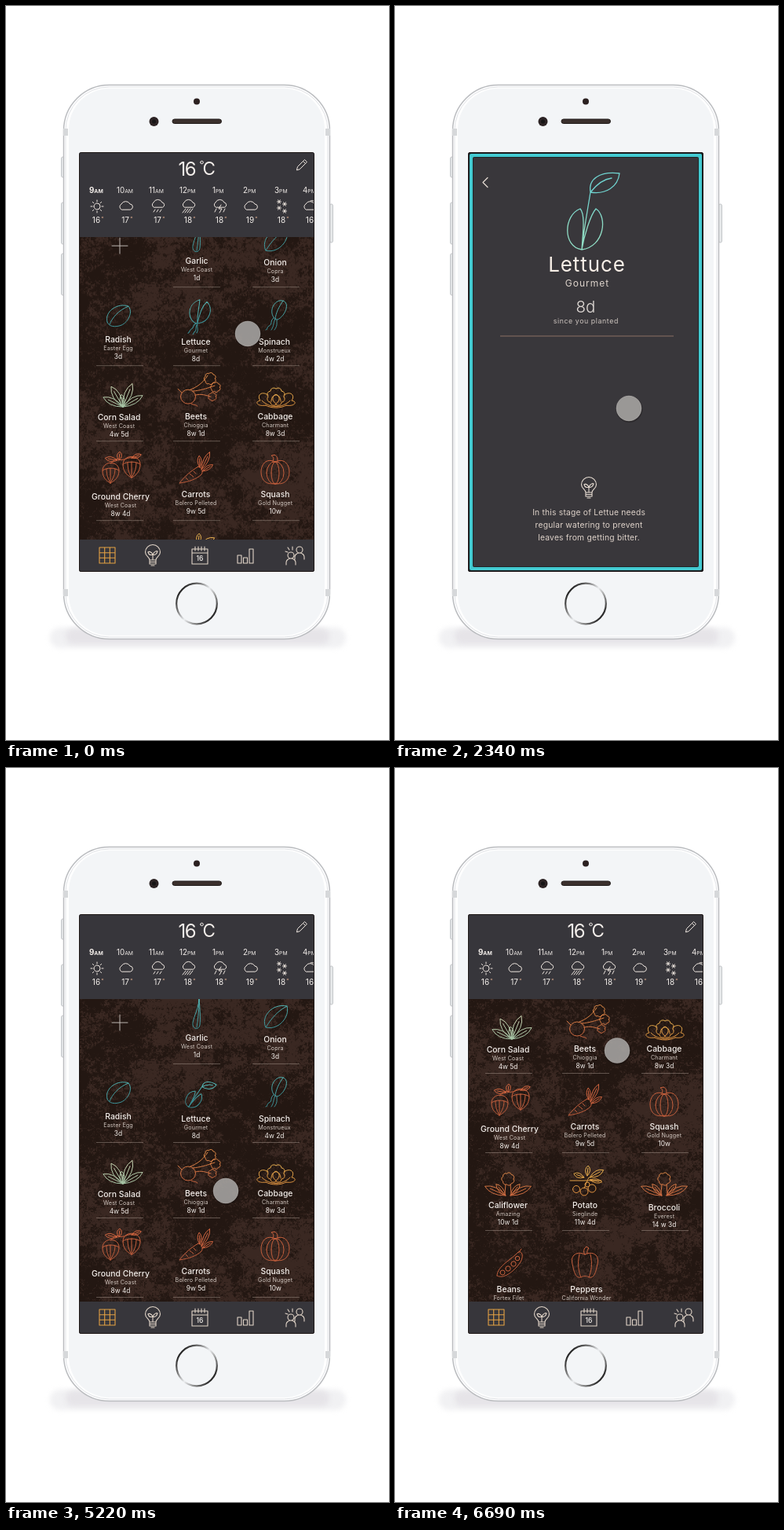
An HTML page with a canvas for the animation above (6.72 s loop, 488 px wide and 934 px high).

```html
<!DOCTYPE html>
<html lang="en">
<head>
<meta charset="utf-8">
<title>Garden planner</title>
<style>
html, body { margin: 0; width: 100%; height: 100%; overflow: hidden; background: #fff; }
canvas { display: block; width: 488px; height: 934px; }
</style>
</head>
<body>
<canvas id="stage"></canvas>
<script>
const LOOP = 6720;
const canvas = document.getElementById('stage');
const ctx = canvas.getContext('2d');
const dpr = window.devicePixelRatio || 1;
canvas.width = 488 * dpr;
canvas.height = 934 * dpr;

// ---------- timing ----------
const ramp = (t, a, b) => Math.min(1, Math.max(0, (t - a) / (b - a)));
const mix = (a, b, p) => a + (b - a) * p;
const easeOut = p => 1 - (1 - p) ** 3;
const easeInOut = p => p < .5 ? 4 * p ** 3 : 1 - 4 * (1 - p) ** 3;

const touchPath = [
  [0, 308, 417], [600, 262, 414], [1200, 262, 414], [1740, 298, 512], [2520, 298, 512],
  [3270, 277, 546], [4200, 277, 546], [5000, 280, 538], [5300, 280, 538], [6480, 283, 359.5]
];
function touchAt(t) {
  const i = touchPath.findIndex(k => k[0] > t);
  if (i < 0) return touchPath.at(-1).slice(1);
  const [a, b] = [touchPath[i - 1], touchPath[i]];
  const p = (b[0] === 6480 ? easeOut : easeInOut)(ramp(t, a[0], b[0]));
  return [mix(a[1], b[1], p), mix(a[2], b[2], p)];
}
const scrollAt = t => t < 3450
  ? -19 * (1 - easeOut(ramp(t, 0, 400)))
  : -184 * easeOut(ramp(t, 5300, 6480));

// ---------- drawing helpers ----------
function text(str, x, y, size, { ls = 0, weight = 400, color = '#f3eeea', align = 'center' } = {}) {
  ctx.font = `${weight} ${size}px Inter, sans-serif`;
  ctx.letterSpacing = ls + 'px';
  ctx.textAlign = align;
  ctx.fillStyle = color;
  ctx.fillText(str, x + (align === 'center' ? ls / 2 : 0), y + size * .36);
  return ctx.measureText(str).width;
}
function box(x, y, w, h, r, fill, stroke, width = 1) {
  ctx.beginPath();
  ctx.roundRect(x, y, w, h, r);
  if (fill) { ctx.fillStyle = fill; ctx.fill(); }
  if (stroke) { ctx.strokeStyle = stroke; ctx.lineWidth = width; ctx.stroke(); }
}
function dot(x, y, r, fill) {
  ctx.beginPath();
  ctx.arc(x, y, r, 0, 7);
  ctx.fillStyle = fill;
  ctx.fill();
}
function rule(x1, y, x2, color) {
  ctx.fillStyle = color;
  ctx.fillRect(x1, y, x2 - x1, 1);
}
function group(alpha, draw) {
  if (alpha <= 0) return;
  ctx.save();
  ctx.globalAlpha *= alpha;
  draw();
  ctx.restore();
}
function icon(path, x, y, color, { scale = 1, angle = 0, width = 1 } = {}) {
  ctx.save();
  ctx.translate(x, y);
  ctx.rotate(angle * Math.PI / 180);
  ctx.scale(scale, scale);
  ctx.lineWidth = width / scale;
  ctx.lineCap = ctx.lineJoin = 'round';
  if (Array.isArray(color)) {
    const g = ctx.createLinearGradient(0, -18, 0, 18);
    color.forEach((c, i) => g.addColorStop(i, c));
    color = g;
  }
  ctx.strokeStyle = color;
  ctx.stroke(path);
  ctx.restore();
}

// ---------- icon shapes, centred on 0,0 ----------
const P = (...parts) => new Path2D(parts.join(' '));
const ring = (x, y, rx, ry = rx) =>
  `M${x - rx} ${y}a${rx} ${ry} 0 1 0 ${2 * rx} 0a${rx} ${ry} 0 1 0 ${-2 * rx} 0`;
function leaf(x, y, deg, len, w) {
  const a = deg * Math.PI / 180, dx = Math.sin(a) * len, dy = -Math.cos(a) * len;
  const px = Math.cos(a) * w, py = Math.sin(a) * w, mx = x + dx * .6, my = y + dy * .6;
  return `M${x} ${y}Q${mx + px} ${my + py} ${x + dx} ${y + dy}` +
    `Q${mx - px} ${my - py} ${x} ${y}L${x + dx * .75} ${y + dy * .75}`;
}
function frill(x, y, r, n) {
  const bump = r * Math.sin(Math.PI / n) * 1.1;
  let d = '';
  for (let i = 0; i <= n; i++) {
    const a = i / n * Math.PI * 2;
    d += `${i ? `A${bump} ${bump} 0 0 1 ` : 'M'}${x + r * Math.cos(a)} ${y + r * Math.sin(a)} `;
  }
  return d;
}
const headOfLeaves = P(frill(0, -7, 7, 7), 'M-4 11L-3 0M4 11L3 0',
  leaf(-3, 14, -66, 29, 8), leaf(3, 14, 66, 29, 8), leaf(-3, 14, -40, 19, 6), leaf(3, 14, 40, 19, 6));

const SHAPES = {
  plus: P('M-10 0H10M0 -10V10'),
  garlic: P('M3 -20C2 -5 -6 6 -5 13C-4 19 3 19 4 13C5 5 4 -8 3 -20C3 -2 1 8 0 16'),
  onion: P('M-13 13C-20 0 -5 -18 14 -14C18 -1 4 17 -13 13C-6 2 2 -8 14 -14'),
  radish: P('M-14 8C-18 -6 0 -17 13 -12C19 -5 13 8 4 12C-4 15 -12 14 -14 8M-11 11C-8 3 0 -7 13 -12'),
  seed: P('M-7 16C-25 2 -12 -38 26 -33C22 -25 4 -5 -7 16M-7 16C10 -2 22 -16 39 -20C47 0 24 28 -7 16',
    'M-7 16C-16 9 -18 22 -26 21C-32 21 -33 26 -38 26M-8 18C-15 18 -14 28 -20 30C-26 30 -25 34 -29 34',
    'M-8 19C-12 21 -10 32 -19 35'),
  sprout: P('M-5 48C-30 44 -28 4 -7 -4C0 4 -4 30 -5 48C-2 30 6 4 13 -4C28 6 24 44 -5 48',
    'C-2 20 2 0 6 -25C3 -42 18 -52 43 -49C41 -32 26 -22 6 -25C14 -35 24 -42 33 -43'),
  spinach: P('M-3 4C-10 -6 0 -20 9 -17C18 -14 12 2 2 7C0 7 -2 6 -3 4M9 -17C4 -10 0 -2 -1 6',
    'M-3 5C-8 8 -4 13 -9 15C-12 16 -10 20 -13 20M-1 6C-4 12 -2 14 -6 20M1 7C1 12 2 15 -2 20'),
  cornSalad: P(leaf(0, 14, -64, 28, 8), leaf(0, 14, -30, 30, 9), leaf(0, 14, 22, 32, 9),
    leaf(0, 14, 60, 29, 8), leaf(0, 14, -6, 16, 6)),
  beets: P(ring(-14, 8, 9.5, 9), 'M-22 3L-27 -2M-10 17C-6 19 -4 18 -2 20',
    'M-11 -1C-4 -4 4 -8 11 -19M-8 1C2 0 8 -2 20 -6M-5 6C3 4 8 6 15 8',
    frill(14, -15, 6.5, 7), frill(21, -4, 5.5, 7), frill(17, 8, 4.5, 6)),
  cabbage: P(frill(0, -1, 10, 8), 'M-6 5C-6 -6 6 -6 6 5M0 8C-6 4 -5 -2 0 -4C5 -2 6 4 0 8',
    'M-10 -3C-18 -9 -25 -3 -20 4C-28 5 -24 12 -13 10M10 -3C18 -9 25 -3 20 4C28 5 24 12 13 10M-18 4C-8 14 8 14 18 4M-13 10C-6 14 6 14 13 10'),
  cherry: P('M-25 4C-25 -9 -4 -9 -4 4C-4 13 -10 17 -15 20C-20 17 -25 13 -25 4C-20 0 -9 0 -4 4M1 -4C1 -17 23 -17 23 -4C23 5 17 11 12 13C6 10 1 5 1 -4C6 -8 18 -8 23 -4',
    'M-15 1V20M-20 2C-20 10 -18 14 -15 20M-9 2C-9 10 -12 14 -15 20M12 -7V13M7 -6C7 3 9 8 12 13M18 -6C18 3 15 8 12 13',
    leaf(-6, -9, -80, 16, 6), leaf(-4, -9, 5, 11, 6), leaf(12, -12, 70, 13, 5), 'M-14 -5C-12 -9 -8 -12 -4 -10C2 -8 8 -14 12 -12'),
  carrots: P('M3 -4C9 -3 9 3 7 6C0 12 -8 15 -21 17C-15 9 -6 1 3 -4M-8 5L-3 9M-3 2L0 5M-13 10L-10 13',
    leaf(7, 0, 25, 25, 6), leaf(8, 2, 58, 16, 5), leaf(5, -3, -3, 15, 5)),
  squash: P('M0 -10C-12 -16 -18 -6 -18 3C-18 14 -10 20 0 17C10 20 18 14 18 3C18 -6 12 -16 0 -10',
    ring(0, 4, 5, 14), ring(0, 4, 11, 14.5), 'M-3 -11C-1 -15 -3 -17 -5 -18L-1 -19C3 -17 3 -14 3 -11'),
  cauliflower: headOfLeaves,
  potato: P(leaf(-2, -4, -70, 14, 6), leaf(2, -6, 5, 13, 6), leaf(5, -4, 62, 20, 7), leaf(5, -1, 100, 16, 5),
    'M-20 0H20M4 -4C1 2 0 5 -2 10', ring(-12, 11, 4.5), ring(-2, 14, 5), ring(8, 10, 5), ring(2, 5, 3)),
  broccoli: headOfLeaves,
  beans: P('M-16 15C-16 3 3 -6 11 -15C17 -17 18 -8 13 -1C5 10 -8 20 -16 15M12 -15L15 -19',
    ring(-9, 11, 3), ring(-2, 6, 3.2), ring(5, 0, 3.2), ring(10, -7, 2.8)),
  peppers: P('M0 -10C-10 -15 -19 -9 -16 2C-14 12 -12 21 -5 19C-2 17 2 17 5 19C12 21 14 12 16 2C19 -9 10 -15 0 -10',
    'M-7 -10C-10 2 -8 12 -5 19M7 -10C10 2 8 12 5 19M0 -10C-3 -14 -1 -18 2 -20L5 -18C2 -15 3 -12 3 -11')
};
const cloudLine = 'M-6 4A4 4 0 0 1 -6 -3A6.2 6.2 0 0 1 5 -3A3.6 3.6 0 0 1 6 4Z';
const smallCloud = 'M-6 1A3.5 3.5 0 0 1 -6 -5A6 6 0 0 1 5 -5A3.2 3.2 0 0 1 6 1Z';
const flake = (x, y) => `M${x - 2.5} ${y}h5M${x - 1.3} ${y - 2.2}l2.6 4.4M${x + 1.3} ${y - 2.2}l-2.6 4.4`;
const rays = Array.from({ length: 8 }, (_, i) => {
  const c = Math.cos(i * Math.PI / 4), s = Math.sin(i * Math.PI / 4);
  return `M${c * 6} ${s * 6}L${c * 8} ${s * 8}`;
}).join('');
const WEATHER = {
  sun: P(ring(0, 0, 4), rays),
  cloud: P(cloudLine),
  drizzle: P(smallCloud, 'M-4 4l-2 3M0 4l-2 3M4 4l-2 3'),
  rain: P(smallCloud, 'M-4 3l-4 5M-1 3l-4 5M2 3l-4 5M5 3l-4 5'),
  storm: P(smallCloud, 'M1 -2l-3 5h4l-3 5M-5 3l-2 4M6 3l-2 4'),
  snow: P(flake(-4, -6), flake(3, -3), flake(-4, 2), flake(3, 6)),
  partly: P(cloudLine, 'M0 -7a4 4 0 0 1 6 3')
};
const bulb = P('M-4 6C-4 2 -9.5 1 -9.5 -4A9.5 9.5 0 0 1 9.5 -4C9.5 1 4 2 4 6ZM-4 6V11H4V6M-4 8.5H4M-2 13H2',
  'M0 5V-1C-2 -5 -5 -5 -6 -4C-5 0 -2 0 0 -1C2 -5 5 -6 6 -5C5 -1 2 0 0 -1');
const person = (x, y) => ring(x, y, 4) + `M${x - 6} ${y + 12}v-3a6 5 0 0 1 12 0v3`;
const TABS = [
  [129, '#e3a143', P('M-10 -10H10V10H-10ZM-3.3 -10V10M3.3 -10V10M-10 -3.3H10M-10 3.3H10')],
  [187, '#e2d5c8', bulb],
  [247, '#e2d5c8', P('M-10 -8H10V11H-10ZM-10 -3H10M-6 -11V-6M-2 -11V-6M2 -11V-6M6 -11V-6')],
  [305, '#e2d5c8', P('M-10 0H-5V10H-10ZM-2.5 3H2.5V10H-2.5ZM5 -8H10V10H5Z')],
  [367, '#e2d5c8', P(person(7, -7), person(-4, 0), 'M-6 -7l-2 -3M-2 -7l0 -4M-8 -4l-3 -1')]
];
const backArrow = P('M3 -6L-3 0L3 6');
const pencil = P('M-6 6L-5 2L4 -7L7 -4L-2 5ZM2 -5L5 -2');

// ---------- list data ----------
const TEAL = ['#51b5b4', '#3a8d93'], GREEN = ['#d4dcb8', '#9fc0a2'], AMBER = ['#e9b652', '#dd8b3c'],
  ORANGE = ['#de8a47', '#c9653f'], RUST = ['#d2653f', '#b95a3a'];
// name, variety, age, label x, label y, icon, icon x, icon y, colour, divider y
const CROPS = [
  ['Garlic', 'West Coast', '1d', 243, 343, 'garlic', 243, 314, TEAL, 376],
  ['Onion', 'Copra', '3d', 343, 345, 'onion', 344, 317, TEAL, 376],
  ['Radish', 'Easter Egg', '3d', 143, 443, 'radish', 143, 413, TEAL, 476],
  ['Lettuce', 'Gourmet', '8d', 242, 446, 'seed', 243, 414, TEAL, 476],
  ['Spinach', 'Monstrueux', '4w 2d', 342, 446, 'spinach', 344, 411, TEAL, 476],
  ['Corn Salad', 'West Coast', '4w 5d', 144, 542, 'cornSalad', 149, 515, GREEN, 572],
  ['Beets', 'Chioggia', '8w 1d', 242, 541, 'beets', 246, 508, ORANGE, 572],
  ['Cabbage', 'Charmant', '8w 3d', 343, 541, 'cabbage', 344, 517, AMBER, 572],
  ['Ground Cherry', 'West Coast', '8w 4d', 146, 643, 'cherry', 148, 606, RUST, 673],
  ['Carrots', 'Bolero Pelleted', '9w 5d', 242, 640, 'carrots', 242, 609, RUST, 673],
  ['Squash', 'Gold Nugget', '10w', 343, 640, 'squash', 343, 609, RUST, 673],
  ['Califlower', 'Amazing', '10w 1d', 144, 740, 'cauliflower', 144, 714, ORANGE, 772],
  ['Potato', 'Sieglinde', '11w 4d', 242, 740, 'potato', 243, 709, AMBER, 772],
  ['Broccoli', 'Everest', '14 w 3d', 343, 743, 'broccoli', 343, 714, ORANGE, 772],
  ['Beans', 'Fortex Filet', '', 145, 847, 'beans', 146, 815, RUST, 877],
  ['Peppers', 'California Wonder', '', 244, 847, 'peppers', 242, 813, RUST, 877]
];
const HOURS = [
  [115, '9', 'AM', 'sun', 16], [152, '10', 'AM', 'cloud', 17], [193, '11', 'AM', 'drizzle', 17],
  [232, '12', 'PM', 'rain', 18], [272, '1', 'PM', 'storm', 18], [311, '2', 'PM', 'cloud', 19],
  [351, '3', 'PM', 'snow', 18], [387, '4', 'PM', 'partly', 16]
];

// ---------- soil texture ----------
const hash = (x, y) => {
  const n = Math.sin(x * 127.1 + y * 311.7) * 43758.5453;
  return n - Math.floor(n);
};
function noise(x, y) {
  const ix = Math.floor(x), iy = Math.floor(y);
  const s = v => v * v * (3 - 2 * v), fx = s(x - ix), fy = s(y - iy);
  return mix(mix(hash(ix, iy), hash(ix + 1, iy), fx), mix(hash(ix, iy + 1), hash(ix + 1, iy + 1), fx), fy);
}
function makeSoil(w, h) {
  const soil = document.createElement('canvas');
  soil.width = w;
  soil.height = h;
  const c = soil.getContext('2d'), img = c.createImageData(w, h);
  for (let y = 0; y < h; y++) for (let x = 0; x < w; x++) {
    const v = noise(x / 55, y / 50) * .3 + noise(x / 18, y / 16) * .25 + noise(x / 6, y / 5) * .25 + noise(x / 1.7, y / 1.7) * .3;
    const k = Math.min(1, Math.max(0, (v - .5) * 6 + (hash(x, y) - .5) * .8));
    img.data.set([mix(35, 58, k), mix(23, 40, k), mix(18, 34, k), 255], (y * w + x) * 4);
  }
  c.putImageData(img, 0, 0);
  c.strokeStyle = 'rgba(150,135,125,.22)';
  for (let i = 0; i < 20; i++) {
    const x = hash(i, 3) * w, y = hash(i, 8) * h;
    c.beginPath();
    c.moveTo(x, y);
    c.lineTo(x + hash(i, 5) * 8 - 4, y + hash(i, 6) * 8 - 4);
    c.stroke();
  }
  return soil;
}
const soil = makeSoil(300, 630);

// ---------- scenes ----------
function drawPhone() {
  ctx.fillStyle = '#fff';
  ctx.fillRect(0, 0, 488, 934);
  ctx.save();
  ctx.filter = `blur(${3 * dpr}px)`;
  box(56, 791, 377, 26, 13, '#f1f1f3');
  box(76, 792, 336, 20, 10, '#e6e4e8');
  ctx.restore();
  for (const [x, y, h] of [[70.5, 192, 26], [70.5, 250, 53], [70.5, 315, 53], [412.5, 252, 49]])
    box(x, y, 4, h, 2, '#e6e8ea', '#c3c6c9');
  box(73.5, 100.5, 339, 705, 58, '#fdfdfe', '#babcbf', 1.5);
  box(76, 103, 334, 700, 55.5, '#fff', '#e1e3e6');
  for (const y of [156, 742]) for (const x of [73, 407]) {
    ctx.fillStyle = '#d6d8da';
    ctx.fillRect(x, y, 6, 9);
  }
  box(80, 105, 326, 696, 52, '#f3f5f7');
  dot(243, 121.5, 4, '#2b2020');
  dot(188.5, 147, 6, '#2c2324');
  dot(188.5, 147, 2.5, '#171516');
  box(212, 144, 62.5, 5.5, 3, '#3b302d', '#211b1a');
  const rim = ctx.createLinearGradient(222, 744, 264, 778);
  [[0, '#222'], [.25, '#777'], [.5, '#eceef0'], [.75, '#888'], [1, '#1d1d1d']].forEach(s => rim.addColorStop(...s));
  ctx.beginPath();
  ctx.arc(243, 760.5, 25.8, 0, 7);
  ctx.strokeStyle = rim;
  ctx.lineWidth = 2.2;
  ctx.stroke();
}

function drawCrop([name, variety, age, x, y, shape, ix, iy, color, divider], t) {
  const col = x < 190 ? 115 : x < 290 ? 213 : 314;
  rule(col, divider, col + 60, 'rgba(190,175,165,.4)');
  text(age, x, y + 22, 8.4);
  if (name === 'Lettuce') {
    if (t > 650 && t < 4000) return;
    const sprouted = t >= 4000;
    icon(SHAPES[sprouted ? 'sprout' : 'seed'], ix, iy, color, sprouted ? { scale: .42, angle: 25 } : { scale: .52, angle: -28 });
  } else icon(SHAPES[shape], ix, iy, color);
  text(name, x, y, 10.4, { weight: 500 });
  text(variety, x, y + 11.3, 7.2, { ls: .12, color: '#cfc5be' });
}

function drawList(t) {
  ctx.save();
  ctx.translate(0, scrollAt(t));
  ctx.drawImage(soil, 93, 280);
  icon(SHAPES.plus, 145, 324, '#bdb6b1');
  CROPS.forEach(crop => drawCrop(crop, t));
  ctx.restore();

  ctx.fillStyle = '#37363b';
  ctx.fillRect(93, 186, 300, 108);
  ctx.fillRect(93, 679, 300, 41);
  text('16', 219.5, 207, 24, { ls: -1.5, align: 'left' });
  text('C', 250.5, 207, 22.5, { align: 'left' });
  icon(P(ring(0, 0, 1.8)), 249.5, 199, '#f3eeea');
  icon(pencil, 376.5, 202.5, '#eee6df');
  HOURS.forEach(([x, hour, half, sky, temp], i) => {
    const weight = i ? 400 : 700;
    const left = x - (hour.length > 1 ? 11 : 9);
    const width = text(hour, left, 234.5, 9.8, { weight, align: 'left' });
    text(half, left + width, 235.5, 6.8, { weight, align: 'left' });
    icon(WEATHER[sky], x + 1, 255, '#eee6df');
    text(temp, x, 272.5, 10);
    icon(P(ring(0, 0, .8)), x + 8, 269, '#c79d84', { width: .7 });
  });
  TABS.forEach(([x, color, path]) => icon(path, x, 699, color, { width: 1.1 }));
  text('16', 247, 703, 8.5, { weight: 500 });
}

function drawDetail(t) {
  box(93, 186, 300, 534, 3, '#1b1a1c');
  box(95, 188, 296, 530, 2, '#43cad1');
  box(99.5, 192.5, 287, 521, 1, '#39373b', '#1f2628');

  group(ramp(t, 1050, 1380), () => {
    icon(backArrow, 115, mix(208, 224.5, easeInOut(ramp(t, 700, 1480))), '#e6dcd4', { width: 1.2 });
    text('8d', 243, 383, 20.5, { weight: 300, color: '#e2dcd8' });
    text('since you planted', 243, 401, 8.8, { ls: .58, color: '#cfc6c0' });
    rule(134, 419.5, 355, '#8c7064');
    icon(bulb, 247, 613, '#e8ddd3', { width: 1.1 });
    ['In this stage of Lettue needs', 'regular watering to prevent', 'leaves from getting bitter.']
      .forEach((row, i) => text(row, 247, 644 + i * 16, 10.3, { ls: .2, color: '#ddd1c8' }));
    group(1 - ramp(t, 2040, 2310), () => {
      text('Have your seed sprout ?', 243.5, 455, 12.6, { ls: .45, color: '#e6dcd4' });
      text('Seeds should sprout in 7-15 days', 243, 474.5, 10.2, { ls: .32, color: '#cfc3ba' });
      box(161, 497, 171.5, 40, 20, '#e6b45c');
      text('Yes', 249.5, 517.5, 15, { ls: .5, color: '#4b4540' });
    });
  });
  group(ramp(t, 2520, 3100), () => {
    text('Your crop have sprout !', 243, 469, 12.6, { ls: .52, color: '#f0a93f' });
    text('We added your sprout day', 244.5, 495.5, 10.2, { ls: .53, color: '#ddd1c8' });
    text('to your calendar', 245, 508.5, 10.2, { ls: .52, color: '#ddd1c8' });
    box(207.5, 533, 72, 14, 7, null, '#a58472');
    text('Back', 243, 540, 8.8, { ls: .25 });
  });
}

// Icon and name travel between the list cell and the head of the detail page.
function drawHead(t, fly) {
  const sprouted = ramp(t, 2040, 2310);
  const color = ['#6fd3cf', '#8fdcc4'];
  group(1 - sprouted, () => icon(SHAPES.seed, mix(243, 254, fly), mix(414, 267, fly), color,
    { scale: mix(.52, 1.02, fly), angle: -28 * (1 - fly), width: 1.3 }));
  group(sprouted, () => icon(SHAPES.sprout, 243, mix(414, 262, fly), color,
    { scale: mix(.42, 1, fly), angle: 25 * (1 - fly), width: 1.3 }));
  text('Lettuce', mix(242, 244, fly), mix(446, 328.5, fly), mix(10.4, 26, fly),
    { ls: .9 * fly, color: '#f8efe7' });
  text('Gourmet', mix(242, 244.5, fly), mix(457, 353, fly), mix(7.2, 12, fly),
    { ls: mix(.12, 1, fly), color: '#ddd3cb' });
}

function drawTouch(t) {
  const [x, y] = touchAt(t);
  dot(x + .5, y + 1, 17, 'rgba(15,12,12,.3)');
  dot(x, y, 16, 'rgba(176,173,171,.84)');
  ctx.strokeStyle = 'rgba(205,202,200,.35)';
  ctx.lineWidth = 1;
  ctx.stroke();
}

function render(t) {
  ctx.setTransform(dpr, 0, 0, dpr, 0, 0);
  drawPhone();
  ctx.save();
  ctx.beginPath();
  ctx.roundRect(93, 186, 300, 534, 3);
  ctx.clip();
  drawList(t);
  box(93.5, 186.5, 299, 533, 2, null, '#1d1716');
  const fly = easeInOut(ramp(t, 650, 1300)) - easeInOut(ramp(t, 3450, 4000));
  group(ramp(t, 720, 1020) - ramp(t, 3480, 3900), () => drawDetail(t));
  if (t > 650 && t < 4000) drawHead(t, fly);
  drawTouch(t);
  ctx.restore();
}

function frame() {
  render(performance.now() % LOOP);
  requestAnimationFrame(frame);
}
frame();
</script>
</body>
</html>
```
